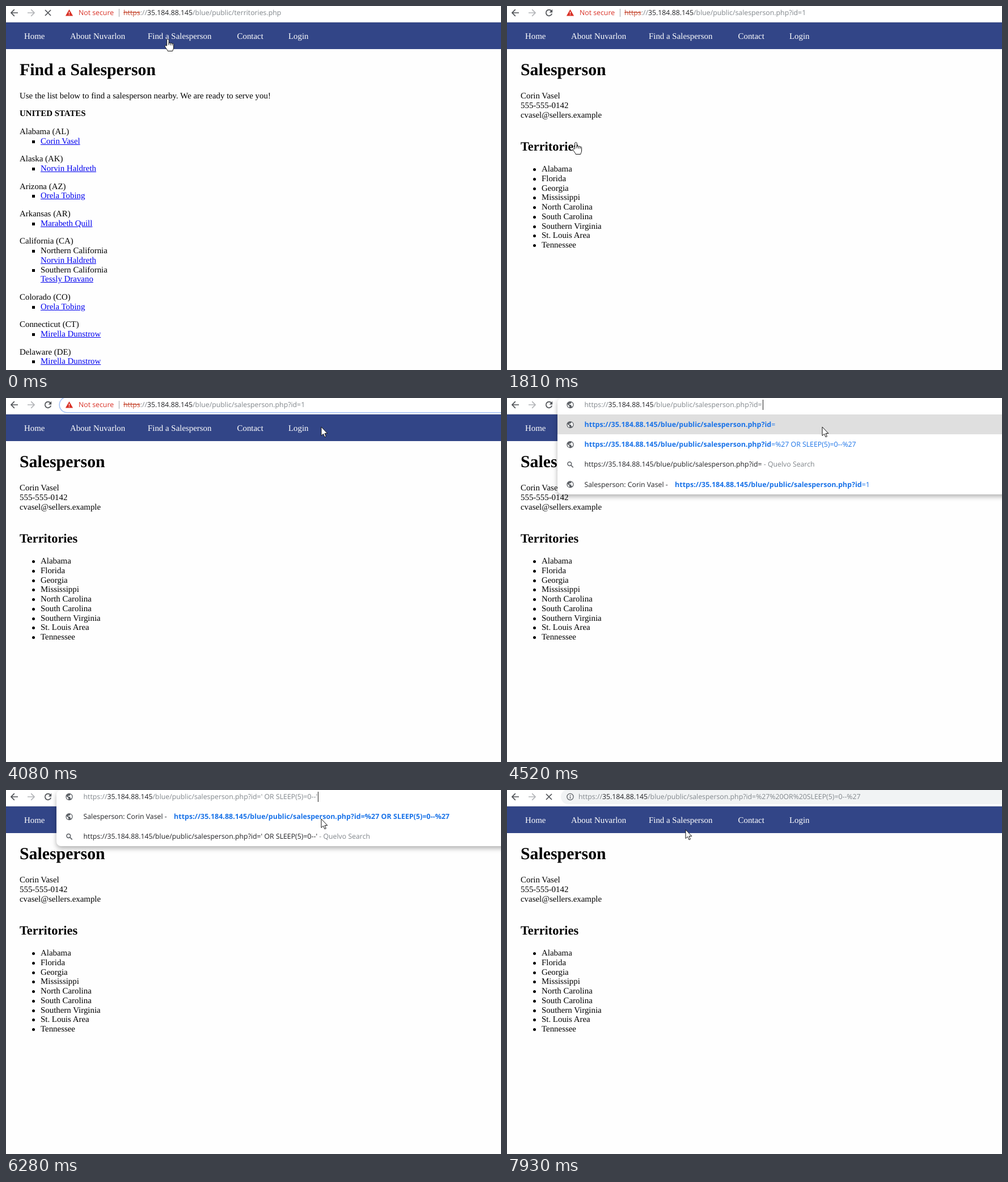
Animation of 873x642 px, one loop 8000 ms. Source, as an HTML page with a canvas:

```html
<!DOCTYPE html>
<html lang="en">
<head>
<meta charset="utf-8">
<title>Find a Salesperson</title>
<style>
html, body { margin: 0; width: 873px; height: 642px; overflow: hidden; background: #fefefe; }
body { position: relative; font: 14.9px/20px "Liberation Serif", serif; color: #000; text-rendering: geometricPrecision; }
div, canvas { position: absolute; }
.t { white-space: pre; transform: translateY(-50%); }
.layer { left: 0; top: 0; width: 873px; height: 642px; }
.h1 { font-size: 29.8px; line-height: 36px; font-weight: bold; }
.h2 { font-size: 22.35px; line-height: 28px; font-weight: bold; }
.link { color: #00e; text-decoration: underline; }
.dot { width: 5px; height: 5px; background: #000; }
.round { border-radius: 50%; }
#bar { left: 0; top: 0; width: 873px; height: 28px; background: #fff; border-bottom: 1px solid #dddee1; overflow: hidden; }
#nav { left: 0; top: 29px; width: 873px; height: 47px; background: #324587; }
#nav div { color: #fff; }
#pill { left: 95px; top: -1px; width: 820px; height: 26px; border-radius: 13px; }
.ui { font: 12.3px/18px "Open Sans", "Noto Sans", sans-serif; color: #80868b; }
.ui b { font-size: 12.5px; color: #1a73e8; }
.ui em { font-style: normal; color: #202124; }
.ui u { text-decoration: none; color: #1a73e8; }
.ui s { color: #c5472f; }
.red { color: #d93025; }
.picked span { background: #3390ff; }
.picked span, .picked span * { color: #fff; }
.caret { position: absolute; top: 0; width: 1px; height: 18px; margin-left: 1px; background: #222; }
.panel { left: 89px; top: 0; width: 820px; background: #fff; border-radius: 8px 0 0 8px; box-shadow: 0 4px 9px rgba(0,0,0,.3); }
.hot { left: 0; top: 29px; width: 820px; height: 35px; background: #dfdfdf; }
</style>
</head>
<body>
<div id="list" class="layer"></div>
<div id="person" class="layer"></div>
<div id="nav"></div>
<div id="bar"><div id="pill"></div></div>
<div id="many" class="panel" style="height:170px"><div class="hot"></div></div>
<div id="few" class="panel" style="height:99px"></div>
<div id="address" class="layer"></div>
<canvas id="top" width="873" height="642"></canvas>
<script>
const $ = id => document.getElementById(id);
const ctx = $('top').getContext('2d');
const LINE = 16.76, DURATION = 8000;

function put(parent, x, y, html, cls = '') {
  const el = document.createElement('div');
  el.className = 't ' + cls;
  el.style.left = x + 'px';
  el.style.top = y + 'px';
  el.innerHTML = html;
  parent.append(el);
  return el;
}

function dot(parent, y, cls = '') {
  const el = document.createElement('div');
  el.className = 'dot ' + cls;
  el.style.left = '46px';
  el.style.top = y - 2 + 'px';
  parent.append(el);
}

// Page content
const agent = 'Corin Vasel';
[[32, 'Home'], [113, 'About Nuvarlon'], [250, 'Find a Salesperson'], [407.5, 'Contact'], [498, 'Login']]
  .forEach(([x, label]) => put($('nav'), x, 25, label));

const list = $('list');
put(list, 24, 113, 'Find a Salesperson', 'h1');
put(list, 24, 159, 'Use the list below to find a salesperson nearby. We are ready to serve you!');
put(list, 24, 190, '<strong>UNITED STATES</strong>');
const north = 'Norvin Haldreth', west = 'Orela Tobing', east = 'Mirella Dunstrow';
const states = [
  ['Alabama (AL)', agent], ['Alaska (AK)', north], ['Arizona (AZ)', west],
  ['Arkansas (AR)', 'Marabeth Quill'],
  ['California (CA)', north, 'Northern California', 'Tessly Dravano', 'Southern California'],
  ['Colorado (CO)', west], ['Connecticut (CT)', east], ['Delaware (DE)', east]
];
let y = 222;
for (const [state, ...entries] of states) {
  put(list, 24, y, state);
  for (let i = 0; i < entries.length; i += 2) {
    y += LINE;
    dot(list, y);
    if (entries[i + 1]) {
      put(list, 61, y, entries[i + 1]);
      y += LINE;
    }
    put(list, 61, y, entries[i], 'link');
  }
  y += LINE + 14.8;
}

const person = $('person');
put(person, 24, 113, 'Salesperson', 'h1');
[agent, '555-555-0142', 'cvasel@sellers.example'].forEach((s, i) => put(person, 24, 159 + i * LINE, s));
put(person, 24, 248, 'Territories', 'h2');
['Alabama', 'Florida', 'Georgia', 'Mississippi', 'North Carolina', 'South Carolina',
 'Southern Virginia', 'St. Louis Area', 'Tennessee'].forEach((s, i) => {
  dot(person, 288 + i * LINE, 'round');
  put(person, 61, 288 + i * LINE, s);
});

// Address bar and suggestions
const host = '35.184.88.145', script = '/blue/public/salesperson.php?id';
const base = 'https://' + host + script;
const inject = "' OR SLEEP(5)=0--'", encoded = '%27 OR SLEEP(5)=0--%27';
const address = (path, scheme = 'https') => `<span>${scheme}://<em>${host}</em>${path}</span><i class="caret"></i>`;
const search = q => `<em>${base}=${q}</em> - Quelvo Search`;
const titled = (panel, y, html) => {
  put(panel, 47.5, y, `<em>Salesperson: ${agent} -</em>`, 'ui');
  put(panel, 207, y, html, 'ui');
};
put($('many'), 47.5, 47, `<b>${base}</b><u>=</u>`, 'ui');
put($('many'), 47.5, 82, `<b>${base}</b><u>=${encoded}</u>`, 'ui');
put($('many'), 47.5, 117, search(''), 'ui');
titled($('many'), 152.5, `<b>${base}</b><u>=1</u>`);
titled($('few'), 47, `<b>${base}=${encoded}</b>`);
put($('few'), 47.5, 82, search(inject), 'ui');

const bar = $('address');
const chip = put(bar, 128, 12, '<span class="red">Not secure</span>', 'ui');
const struck = '<s>https</s>';
const fields = {
  list: put(bar, 207, 12, address('/blue/public/territories.php', struck), 'ui'),
  person: put(bar, 207, 12, address(script + '=1', struck), 'ui'),
  many: put(bar, 136.5, 12, address(script + '='), 'ui'),
  few: put(bar, 136.5, 12, address(script + '=' + inject), 'ui'),
  load: put(bar, 126, 12, address(script + '=' + encoded.replace(/ /g, '%20')), 'ui')
};

// Pointer: start, end, steps, then a quadratic curve
const glides = [
  [130, 700, 5, 285.5, 58, 330, 110, 284, 176],
  [1100, 1410, 3, 284, 176, 190, 220, 121.5, 240],
  [1930, 2760, 7, 121.5, 240, 380, 150, 544, 15],
  [3930, 4080, 2, 544, 15, 550, 33, 556, 51],
  [7270, 7930, 6, 556, 51, 590, 182, 315, 70]
];
function pointerAt(t) {
  const [t0, t1, n, x0, y0, cx, cy, x1, y1] = glides.findLast(g => t >= g[0]) || glides[0];
  const step = t < t0 ? 0 : Math.floor((t - t0) / (t1 - t0) * (n - 1) + 1e-6) + 1;
  const u = Math.min(1, step / n);
  const curve = (a, c, b) => (1 - u) ** 2 * a + 2 * u * (1 - u) * c + u * u * b;
  return [curve(x0, cx, x1), curve(y0, cy, y1)];
}

const arrow = new Path2D('M0 0V15.5L3.6 12.2 6 17.8 8.4 16.8 6.1 11.4H10.8Z');
const hand = new Path2D('M-1.8 12V1.8a1.8 1.8 0 013.5 0V8c.5-1.6 3-1.4 3.1.2 .6-1.3 2.8-1.1 2.9.6 .6-1.1 2.4-.7 2.4 1V15c0 3-1.4 4-1.8 6.5H-.3c-.6-2.4-3.2-4.8-4.7-7.8-.8-2.1 1.2-2.9 2.2-1.6z');
const knuckles = new Path2D('M1.7 7v4M4.8 8.2v3.2M7.7 8.8v2.8');
const beam = new Path2D('M-3 -6.5H-1L0 -5.5 1 -6.5H3M0 -5.5V5.5M-3 6.5H-1L0 5.5 1 6.5H3');

function at(x, y, draw) {
  ctx.save();
  ctx.translate(x, y);
  draw();
  ctx.restore();
}

function stroke(path, color, width) {
  ctx.strokeStyle = color;
  ctx.lineWidth = width;
  ctx.stroke(typeof path === 'string' ? new Path2D(path) : path);
}

function fill(path, color) {
  ctx.fillStyle = color;
  ctx.fill(typeof path === 'string' ? new Path2D(path) : path);
}

function drawPointer(t) {
  const [x, y] = pointerAt(t);
  const linked = t < 130 || (t >= 1410 && t < 1930);
  at(x, y, () => {
    if (y < 26) return stroke(beam, '#000', 1.2);
    const shape = linked ? hand : arrow;
    fill(shape, '#fff');
    stroke(shape, '#111', 1);
    if (linked) stroke(knuckles, '#111', 1);
  });
}

// Icons
const disc = r => `M${-r} 0a${r} ${r} 0 1 0 ${2 * r} 0a${r} ${r} 0 1 0 ${-2 * r} 0z`;
const icons = {
  globe() {
    fill(disc(6.2), '#5f6368');
    fill('M-4.8 -1L-1.5 2V4.8C-3.5 4.3 -5.2 2 -4.8 -1ZM-.5 -4.8H2V-3L.2 -1.8H-1.5V0H1.8V2.3L3.6 3.2C5.6 1 5.2 -2.3 3 -4L2 -4.8Z', '#fff');
  },
  search() {
    at(-1.2, -1.2, () => stroke(disc(3.4), '#5f6368', 1.5));
    stroke('M1.4 1.4L5.2 5.2', '#5f6368', 1.7);
  },
  info() {
    stroke(disc(5.6), '#5f6368', 1.3);
    stroke('M0 -3.2V-1.6M0 -.5V3.2', '#5f6368', 1.4);
  },
  warn() {
    fill('M0 -6L6.6 5.6H-6.6Z', '#d93025');
    stroke('M0 -2V1.6M0 2.7V4.1', '#fff', 1.3);
  },
  back: color => stroke('M6.5 0H-5.5M.3 -5.8L-5.5 0 .3 5.8', color, 1.7),
  stop: () => stroke('M-5 -5L5 5M5 -5L-5 5', '#505357', 1.7),
  reload() {
    stroke('M4.2 -3.4A5.3 5.3 0 1 0 5.2 1.4', '#505357', 1.7);
    fill('M6.2 -6.2V-.6H.6Z', '#505357');
  }
};
const icon = (name, x, y, arg) => at(x, y, () => icons[name](arg));

const show = (el, on) => { el.style.display = on ? 'block' : 'none'; };
const within = (t, ...spans) => spans.some(([a, b]) => t >= a && t < b);

function render(t) {
  const mode = t < 1810 ? 'list' : t < 4520 ? 'person' : t < 5220 ? 'many' : t < 6560 ? 'few' : 'load';
  const secureChip = mode === 'list' || mode === 'person';
  const focused = within(t, [2890, 4520]);
  const caretOn = within(t, [3140, 3530], [3930, 4080], [4520, 5070], [5220, 5690], [6280, 6560]);

  show(list, mode === 'list');
  show(person, mode !== 'list');
  show($('many'), mode === 'many');
  show($('few'), mode === 'few');
  show(chip, secureChip);
  for (const name in fields) {
    show(fields[name], name === mode);
    fields[name].querySelector('.caret').style.visibility = caretOn ? 'visible' : 'hidden';
  }
  fields.person.classList.toggle('picked', within(t, [2890, 3140]));
  $('pill').style.background = mode === 'load' ? '#f1f3f4' : '#fff';
  $('pill').style.boxShadow = focused ? '0 0 0 1.6px #a3c0f4' : 'none';

  ctx.clearRect(0, 0, 873, 642);
  icon('back', 14.5, 12, '#505357');
  at(44.5, 12, () => {
    ctx.scale(-1, 1);
    icons.back('#b4b6b9');
  });
  icon(t < 130 || mode === 'load' ? 'stop' : 'reload', 74, 12);
  if (secureChip) {
    icon('warn', 111.5, 12);
    stroke('M199.5 5V19', '#a0a3a7', 1);
  } else if (mode === 'load') {
    icon('info', 111.5, 12);
  } else {
    const names = mode === 'many' ? ['globe', 'globe', 'globe', 'search', 'globe'] : ['globe', 'globe', 'search'];
    names.forEach((name, i) => icon(name, 111.5, 12 + i * 35.1));
  }
  drawPointer(t);
}

function tick(now) {
  render(now % DURATION);
  requestAnimationFrame(tick);
}
render(0);
requestAnimationFrame(tick);
</script>
</body>
</html>
```
